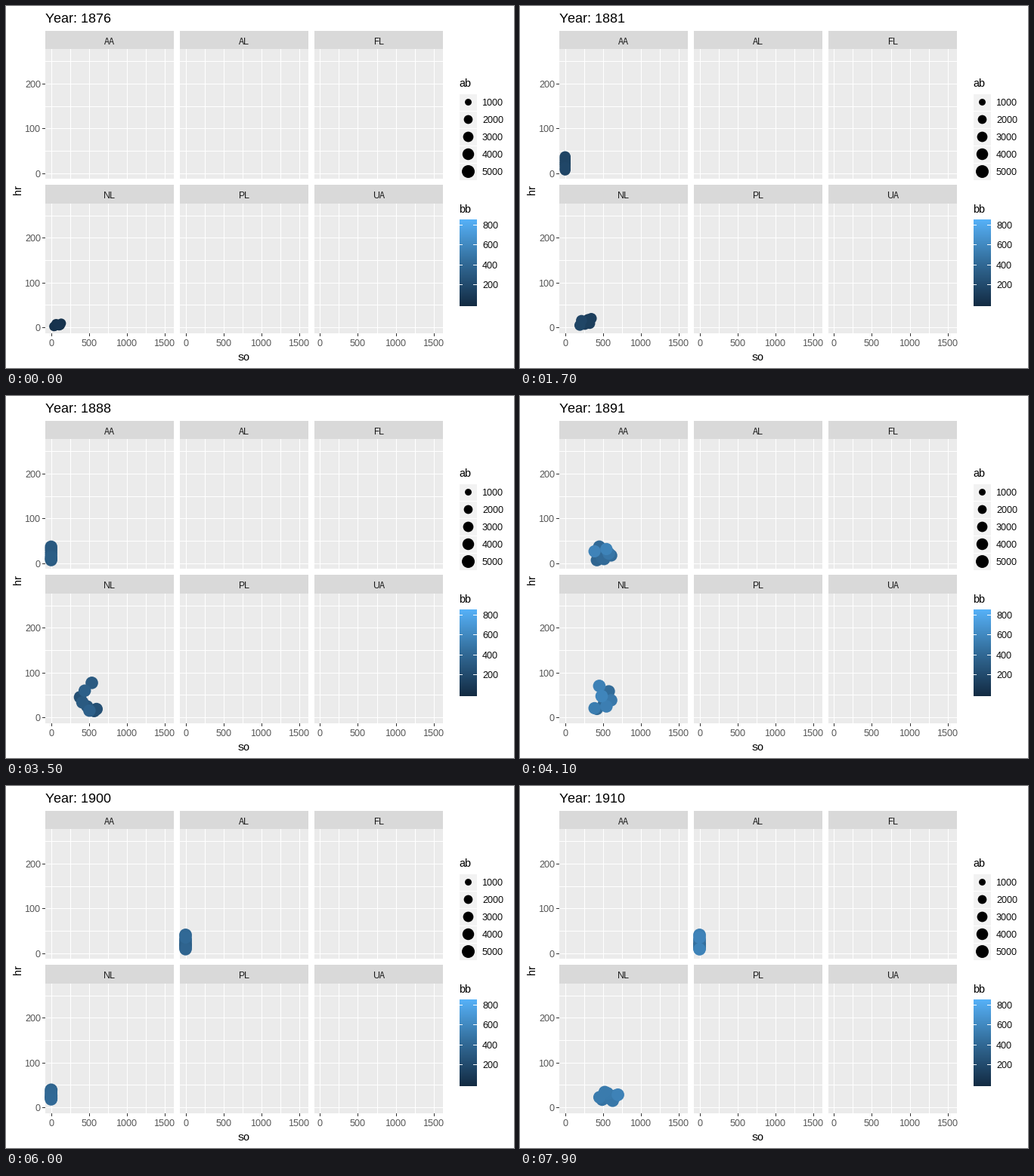
A matplotlib script that plays this animation: 672 px wide and 480 px high, repeating every 8000 ms.

```python
import numpy as np
import matplotlib as mpl
import matplotlib.pyplot as plt
from matplotlib.animation import FuncAnimation
from matplotlib.colors import LinearSegmentedColormap
from matplotlib.patches import Rectangle

mpl.rcParams.update({
    "font.family": "Liberation Sans",
    "text.hinting": "native",
    "text.hinting_factor": 1,
})

W, H, DPI = 672, 480, 96
FRAMES, STEP = 80, 100
LEAGUES = ["AA", "AL", "FL", "NL", "PL", "UA"]
BLUES = LinearSegmentedColormap.from_list(
    "blues", ["#132B43", "#326B98", "#56B1F7"])

# Pixel layout of the facets
COL, ROW = 177.81, 204.3
X0, Y0 = 59.7, 221.8
PX_SO, PX_HR = 0.1003, 0.594

# Seasons played and home run range of the leagues beside NL
OTHERS = {
    "AA": (1882, 1891, 7, 37),
    "AL": (1901, 1910, 9, 41),
    "PL": (1890, 1890, 20, 64),
    "UA": (1884, 1884, 3, 32),
}


def trend(points):
    """Piecewise linear function of the year through a few points."""
    years, values = zip(*points)
    return lambda year: np.interp(year, years, values)


hr_low = trend([(1876, 2), (1883, 5), (1884, 14), (1888, 14), (1895, 25),
                (1901, 18), (1904, 9), (1910, 15)])
hr_high = trend([(1876, 9), (1882, 20), (1883, 34), (1884, 142), (1885, 54),
                 (1888, 77), (1895, 61), (1901, 39), (1907, 23), (1910, 34)])
mean_so = trend([(1876, 85), (1879, 243), (1882, 270), (1884, 575),
                 (1888, 490), (1892, 500), (1893, 285), (1896, 300),
                 (1910, 575)])
mean_bb = trend([(1876, 45), (1880, 95), (1884, 190), (1888, 290),
                 (1890, 440), (1893, 510), (1896, 400), (1901, 330),
                 (1910, 460)])
mean_ab = trend([(1876, 2500), (1880, 3000), (1884, 3800), (1888, 4650),
                 (1910, 4950)])


def dot_size(ab):
    """Marker area in square points for a number of at-bats."""
    share = (np.asarray(ab) - 272) / 5509
    px = (1 + 5 * np.sqrt(share)) * 2.845 + 0.9
    return (px * 72 / DPI) ** 2


def strikeouts(year, league, spread):
    """Strikeouts per team, zero where the league did not record them."""
    unrecorded = (1897 <= year < 1910 or league in ("AL", "UA")
                  or league == "AA" and year < 1889)
    if unrecorded:
        return 0 * spread
    mean = mean_so(year) * (0.75 if league == "PL" else 1)
    return mean * (1 + (0.15 + 35 / mean) * spread)


def league_dots(year, i):
    league = LEAGUES[i]
    if league == "NL":
        low, high = hr_low(year), hr_high(year)
    else:
        first, last, low, high = OTHERS.get(league, (0, 0, 0, 0))
        if not first <= year <= last:
            return np.empty((0, 4))
    rng = np.random.default_rng(year * 10 + i)
    n = 12 if league == "NL" and 1892 <= year < 1900 else 8
    # A wide range means one team far above the others
    skew = 1 + ((high - low) / 60) ** 2
    hr = low + (high - low) * rng.permutation(np.linspace(0, 1, n)) ** skew
    so = strikeouts(year, league, rng.permutation(np.linspace(-1, 1, n)))
    ab = mean_ab(year) * rng.uniform(0.96, 1.04, n)
    bb = np.sort(mean_bb(year) * rng.uniform(0.75, 1.25, n))
    if league == "UA":
        bb = bb * 0.6
    x = X0 + COL * (i % 3) + PX_SO * so
    y = Y0 + ROW * (i // 3) - PX_HR * hr
    return np.column_stack([x, y, dot_size(ab), bb / 835])


def year_dots(year):
    return np.vstack([league_dots(year, i) for i in range(len(LEAGUES))])


fig = plt.figure(figsize=(W / DPI, H / DPI), dpi=DPI, facecolor="white")
ax = fig.add_axes([0, 0, 1, 1])


def box(x, y, w, h, color):
    ax.add_patch(Rectangle((x, y), w, h, fc=color, lw=0, antialiased=False,
                           zorder=1))


def label(x, y, text, px=12, color="black", ha="left", **kw):
    return ax.text(x, y, text, fontsize=px * 72 / DPI, color=color, ha=ha,
                   va="baseline", zorder=3, **kw)


def draw_panel(i):
    col, row = i % 3, i // 3
    left, top = round(52 + COL * col), 57 + 205 * row
    strip = 33 + 204 * row
    zero_x, zero_y = X0 + COL * col, Y0 + ROW * row
    box(left, strip, 170, top - strip, "#D9D9D9")
    box(left, top, 170, 172, "#EBEBEB")
    label(left + 85, strip + 18, LEAGUES[i], color="#1A1A1A", ha="center")
    for so in range(0, 1501, 250):
        x = round(zero_x + PX_SO * so)
        box(x, top, 1, 172, "white")
        if row and so % 500 == 0:
            box(x, top + 172, 1, 4, "#333333")
            label(x, 451, str(so), color="#4D4D4D", ha="center")
    for hr in range(0, 251, 50):
        y = round(zero_y - PX_HR * hr)
        box(left, y, 170, 1, "white")
        if col == 0 and hr % 100 == 0:
            box(48, y, 4, 1, "#333333")
            label(46, y + 5, str(hr), color="#4D4D4D", ha="right")


def draw_legends():
    label(599, 107, "ab", 15)
    box(600, 116, 23, 115, "#F2F2F2")
    counts = range(1000, 5001, 1000)
    for k, ab in enumerate(counts):
        box(600, 116 + 23 * k, 23, 1, "white")
        label(630, 132 + 23 * k, str(ab))
    ax.scatter([611.5] * 5, [127.5 + 23 * k for k in range(5)],
               s=dot_size(counts), c="black", lw=0, snap=False, zorder=2)
    label(599, 274, "bb", 15)
    ax.imshow(np.linspace(1, 0, 115)[:, None], cmap=BLUES, aspect="auto",
              extent=(600, 623, 398, 283), zorder=1)
    for bb in range(200, 801, 200):
        y = int(396 - 0.132 * bb)
        box(600, y, 4, 1, "white")
        box(618, y, 5, 1, "white")
        label(630, y + 5, str(bb))


for i in range(len(LEAGUES)):
    draw_panel(i)
draw_legends()
label(315, 470, "so", 15, ha="center")
label(20, 244, "hr", 15, ha="center", rotation=90, rotation_mode="anchor")
title = label(52, 22, "", 18)
dots = ax.scatter([], [], lw=0, snap=False, zorder=2)

ax.set_xlim(0, W)
ax.set_ylim(H, 0)
ax.axis("off")


def clock(frame):
    """Year in the title and year of the data, which leads by half a step."""
    if frame < 31:
        year, part = divmod(frame, 3)
        return 1876 + year, 1876 + year + part // 2
    year, half = divmod(frame - 31, 2)
    return 1886 + year, 1886 + year + half


def update(frame):
    shown, current = clock(frame)
    data = year_dots(current)
    title.set_text(f"Year: {shown}")
    dots.set_offsets(data[:, :2])
    dots.set_sizes(data[:, 2])
    dots.set_facecolor(BLUES(data[:, 3]))
    return title, dots


anim = FuncAnimation(fig, update, frames=FRAMES, interval=STEP, repeat=True,
                     repeat_delay=0, blit=False)
plt.show()
```
